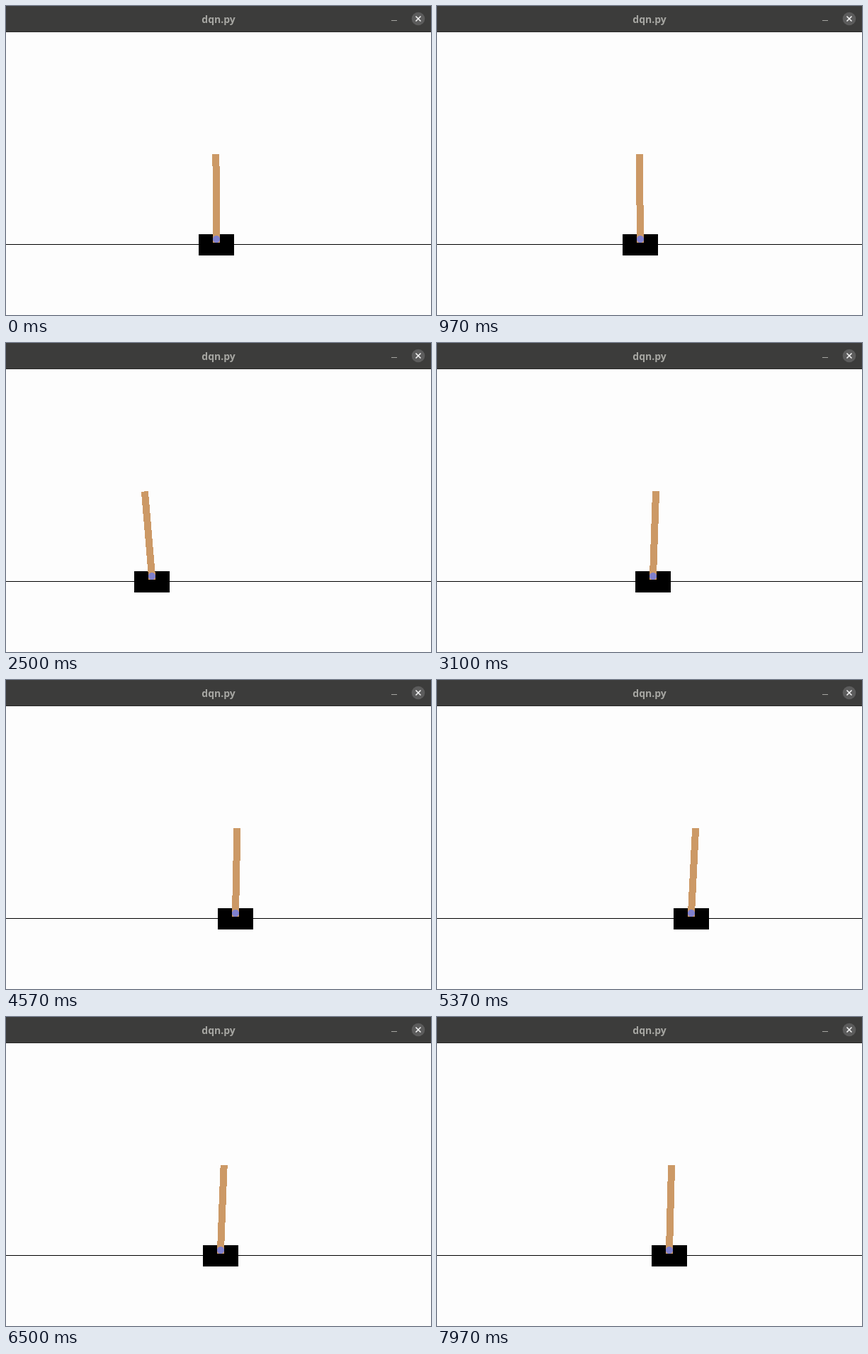
Recreate the animation shown at these times as an HTML page. Size 600x436 px, loop 8000 ms.

```html
<!DOCTYPE html>
<html lang="en">
<head>
<meta charset="utf-8">
<title>dqn.py</title>
<style>
  html, body { margin: 0; width: 100%; height: 100%; overflow: hidden; background: #fdfdfd; }
  svg { display: block; width: 600px; height: 436px; }
  text { font: bold 14px "Noto Sans", "Open Sans", sans-serif; fill: #a6a6a2; text-anchor: middle; }
</style>
</head>
<body>
<svg viewBox="0 0 600 436">
  <rect width="600" height="436" fill="#fdfdfd"/>
  <rect width="600" height="37" fill="#3c3c3b"/>
  <rect y="36" width="600" height="1" fill="#282828"/>
  <text x="300" y="24">dqn.py</text>
  <rect x="544" y="20" width="8" height="1" fill="#a6a6a2"/>
  <circle cx="582" cy="18" r="9.3" fill="#5c5c5c"/>
  <path d="M578.5 14.5l7 7m0-7l-7 7" stroke="#f2f2f2" stroke-width="1.6"/>

  <rect y="336" width="600" height="1" fill="#000"/>
  <g id="cart" shape-rendering="crispEdges">
    <rect x="-25" y="322" width="50" height="30" fill="#000"/>
    <rect id="pole" x="-5" y="-120" width="10" height="125" fill="#cc9966"/>
    <circle cy="329" r="5" fill="#8080cc"/>
  </g>
</svg>
<script>
const LOOP = 8000;
const AXLE_Y = 329;
const LEAN_PER_PIXEL = 0.053;

// The cart drifts away from its start exponentially, and the pole leans the same way.
// Every new episode resets it to the middle. Times in ms, lengths in px, lean in degrees.
const episodes = [
  { begin: 0,    x: 297,   drift: -4.52, growth: 1.22,  lean: -0.27, wobble: 0 },
  { begin: 3085, x: 303.8, drift: 5,     growth: 1.085, lean: 2,     wobble: 13 },
  { begin: 6440, x: 302.5, drift: 10,    growth: 0.83,  lean: 2.5,   wobble: 0 },
];

const cart = document.getElementById('cart');
const pole = document.getElementById('pole');

function draw(time) {
  const { begin, x, drift, growth, lean, wobble } =
    episodes.findLast(episode => episode.begin <= time);
  const seconds = (time - begin) / 1000;
  const offset = drift * (Math.exp(growth * seconds) - 1);
  const sway = wobble * Math.exp(-3 * seconds) * Math.sin(6 * seconds);
  const angle = lean * Math.exp(-2 * seconds) + LEAN_PER_PIXEL * offset;
  cart.setAttribute('transform', `translate(${Math.round(x + offset + sway)} 0)`);
  pole.setAttribute('transform', `translate(0 ${AXLE_Y}) rotate(${angle})`);
}

const start = performance.now();
function tick() {
  draw((performance.now() - start) % LOOP);
  requestAnimationFrame(tick);
}
tick();
</script>
</body>
</html>
```
